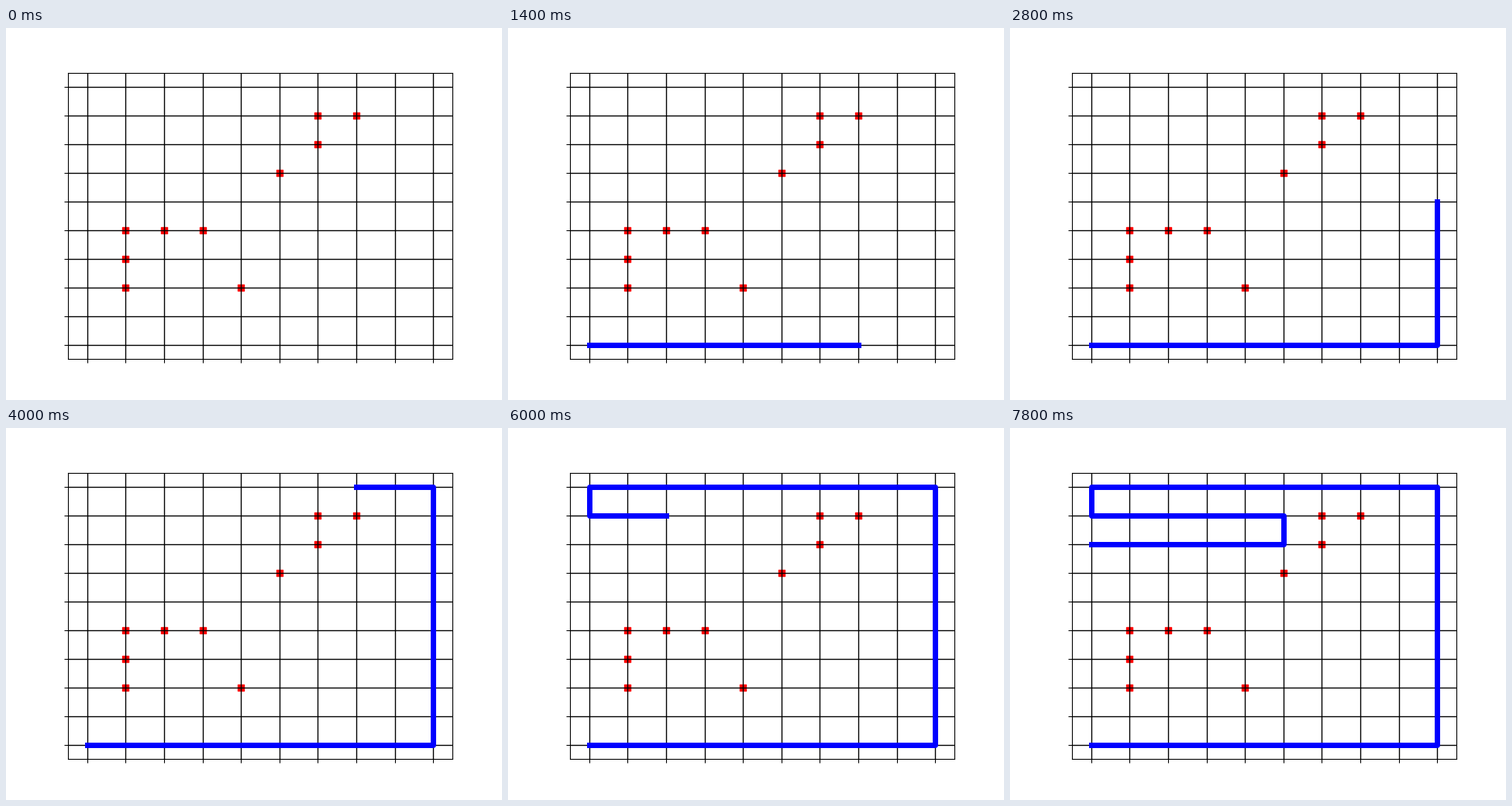
Animation of 640x480 px, one loop 8000 ms. Source, as a matplotlib script:

```python
import matplotlib.pyplot as plt
import numpy as np
from matplotlib.animation import FuncAnimation

STEP_MS = 200
STEPS = 40
SIZE = 10
RIGHT, UP, LEFT, DOWN = (1, 0), (0, 1), (-1, 0), (0, -1)


def wall(*corners):
    """All grid cells along a chain of straight or diagonal runs."""
    cells = {corners[0]}
    for a, b in zip(corners, corners[1:]):
        n = np.abs(np.subtract(b, a)).max() + 1
        cells |= {tuple(c) for c in np.linspace(a, b, n).round().astype(int)}
    return cells


OBSTACLES = (wall((1, 2), (1, 4), (3, 4)) | wall((4, 2))
             | wall((5, 6), (6, 7), (6, 8), (7, 8)))


def is_free(cell):
    return min(cell) >= 0 and max(cell) < SIZE and cell not in OBSTACLES


def drive(path, heading, limit=SIZE):
    """Extend the path straight ahead until it is blocked."""
    for _ in range(limit):
        ahead = (path[-1][0] + heading[0], path[-1][1] + heading[1])
        if not is_free(ahead):
            break
        path.append(ahead)


def sweep():
    """Round the border to the top, then row by row downwards."""
    path = [(0, 0)]
    for heading in (RIGHT, UP, LEFT):
        drive(path, heading)
    while len(path) < STEPS:
        for heading in (RIGHT, LEFT):
            drive(path, DOWN, limit=1)
            drive(path, heading)
    return path


PATH = sweep()

fig, ax = plt.subplots(figsize=(6.4, 4.8), dpi=100)
ax.set(xlim=(-0.5, SIZE - 0.5), ylim=(-0.5, SIZE - 0.5),
       xticks=range(SIZE), yticks=range(SIZE))
ax.tick_params(labelbottom=False, labelleft=False)
ax.grid(color="black", linestyle="-", linewidth=1)

ax.scatter(*zip(*sorted(OBSTACLES)), color="red", marker="s")
route, = ax.plot([], [], color="blue", linewidth=5)


def update(step):
    route.set_data(*zip(*PATH[:step + 1]))
    return route,


anim = FuncAnimation(fig, update, frames=STEPS, interval=STEP_MS,
                     repeat=True, repeat_delay=0)
plt.show()
```
